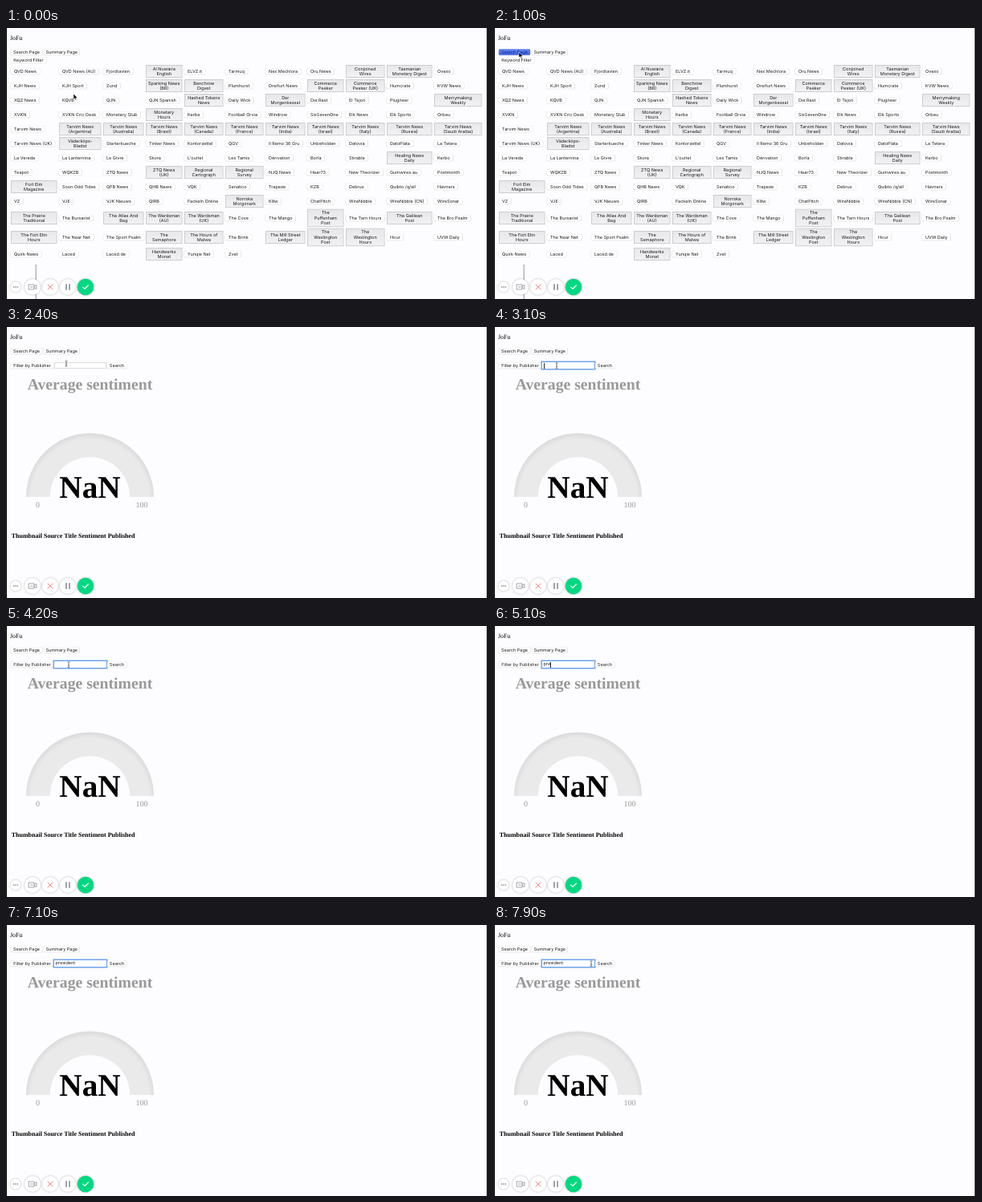
Write an HTML page that moves like this. It is 600 by 338 pixels and loops after 8 s.

```html
<!DOCTYPE html>
<html lang="en">
<head>
<meta charset="utf-8">
<title>News search</title>
<style>
  html, body { margin: 0; width: 100%; height: 100%; overflow: hidden; background: #fdfcfe; }
  #stage {
    position: relative; width: 600px; height: 338px; overflow: hidden; background: #fdfcfe;
    font: 5.5px/7px Inter, Roboto, sans-serif; color: #1c1c1c;
    text-rendering: geometricPrecision; white-space: nowrap;
  }
  .page, svg { position: absolute; inset: 0; }
  svg { width: 600px; height: 338px; }
  svg text { font-family: "Liberation Serif", "Times New Roman", serif; }

  /* Buttons are laid out at double size, which allows half-pixel lines. */
  .btn {
    position: absolute; box-sizing: border-box; width: calc(var(--w) * 2px); height: 15px; padding: 0 8px;
    transform: scale(.5) translateY(-50%); transform-origin: 0 0;
    font-size: 11px; line-height: 15px; text-align: center; background: #fff; border-radius: 3px;
    box-shadow: 0 0 1px .6px rgba(0, 0, 0, .18), 0 1px 1px rgba(0, 0, 0, .12);
  }
  .tall {
    height: auto; padding: 1px 0; border: 2px solid #cdccce; border-radius: 0; box-shadow: none;
    line-height: 13px; background: linear-gradient(#e8e7e9, #f1f0f2);
  }
  .bar { padding: 0; }

  /* One loop is 8000 ms, so 1.25% is 100 ms. */
  .anim, #typed i { animation: 8s step-end infinite; }
  #list { animation-name: list; }
  #search { animation-name: search; }
  #press { animation-name: press; background: linear-gradient(#6685ee, #3f63e4); color: #182c8a; }
  #ring { animation-name: ring; }
  #caret { animation-name: caret; }
  #pointer { animation-name: move; }
  #arrow { animation-name: arrow; }
  #beam { animation-name: beam; }

  @keyframes list { 0% { visibility: visible } 13.75%, to { visibility: hidden } }
  @keyframes search { 0% { visibility: hidden } 13.75%, to { visibility: visible } }
  @keyframes press { 0%, 13.75%, to { opacity: 0 } 12.5% { opacity: 1 } }
  @keyframes ring { 0% { opacity: 0 } 33.75%, to { opacity: 1 } }
  @keyframes caret {
    0%, 40%, 52.5%, 88.75%, to { opacity: 0 }
    33.75%, 46.25%, 56.25% { opacity: 1 }
  }
  @keyframes arrow { 0% { opacity: 1 } 28.75%, to { opacity: 0 } }
  @keyframes beam { 0%, 56.25% { opacity: 0 } 28.75%, 93.75%, to { opacity: 1 } }
  @keyframes move {
    0% { transform: translate(84px, 82px); animation-timing-function: steps(4) }
    5% { transform: translate(51px, 51px); animation-timing-function: steps(4) }
    10% { transform: translate(31px, 30px) }
    23.75% { transform: translate(31px, 30px); animation-timing-function: steps(3) }
    27.5% { transform: translate(58px, 40px); animation-timing-function: steps(2) }
    30% { transform: translate(75px, 45.5px); animation-timing-function: steps(2) }
    32.5% { transform: translate(79px, 47.5px) }
    38.75% { transform: translate(78px, 48px) }
    92.5% { transform: translate(80px, 48px); animation-timing-function: steps(5) }
    98.75%, to { transform: translate(121px, 48px) }
  }

  #field, #ring { position: absolute; box-sizing: border-box; left: 60px; top: 44px; width: 65px; height: 8px; }
  #field { background: #fff; border: 1px solid #dddce0; }
  #ring { background: #fff; box-shadow: 0 0 0 1.5px #6ea3ec; }
  #typed { position: absolute; left: 61.5px; top: 45px; height: 7px; display: flex; }
  #typed i { font-style: normal; }
  #caret { width: .8px; height: 6.5px; margin-left: .2px; background: #222; }
</style>
</head>
<body>
<div id="stage">
  <svg>
    <path d="M0 0H1V338H0ZM598.5 0H600V338H598.5Z"/>
    <text x="5" y="15" font-size="8">JoFu</text>
  </svg>
  <div class="btn bar" style="left:6px;top:30.2px;--w:39">Search Page</div>
  <div class="btn bar" style="left:47px;top:30.2px;--w:44.5">Summary Page</div>
  <div class="btn bar anim" id="press" style="left:6px;top:30.2px;--w:39">Search Page</div>

  <div class="page anim" id="list">
    <svg><path d="M37.2 295V338" stroke="#666" stroke-width=".7"/></svg>
    <div class="btn bar" style="left:5.5px;top:39.5px;--w:44">Keyword Filter</div>
  </div>

  <div class="page anim" id="search">
    <div class="btn bar" style="left:6px;top:48.4px;--w:53">Filter by Publisher</div>
    <div id="field"></div>
    <div id="ring" class="anim"></div>
    <div id="typed"></div>
    <div class="btn bar" style="left:126px;top:48.4px;--w:24">Search</div>
    <svg>
      <defs>
        <radialGradient id="shade" gradientUnits="userSpaceOnUse" cx="104.5" cy="214" r="82">
          <stop offset=".9" stop-color="#ebeaea"/>
          <stop offset="1" stop-color="#d9d8da"/>
        </radialGradient>
      </defs>
      <path d="M25 212A79.5 79.5 0 0 1 184 212H154.2A49.7 49.7 0 0 0 54.8 212Z" fill="url(#shade)"/>
      <g text-anchor="middle" fill="#999">
        <text x="104.5" y="78" font-size="19.7" font-weight="700">Average sentiment</text>
        <text x="39.5" y="225" font-size="10">0</text>
        <text x="169" y="225" font-size="10">100</text>
        <text x="104.5" y="213" font-size="39.3" font-weight="700" fill="#000">NaN</text>
      </g>
      <text x="6.7" y="262.5" font-size="8" font-weight="700" fill="#000">Thumbnail Source Title Sentiment Published</text>
    </svg>
  </div>

  <svg fill="none" stroke-linecap="round" stroke-linejoin="round">
    <g fill="#fff" style="filter:drop-shadow(0 .8px 1.3px rgba(0,0,0,.3))">
      <circle cx="12" cy="323" r="6.5"/>
      <circle cx="33" cy="323" r="10"/>
      <circle cx="55" cy="323" r="10"/>
      <circle cx="77" cy="323" r="10"/>
      <circle cx="99" cy="323" r="10.3" fill="#00d982"/>
    </g>
    <path d="M9.7 323h.01M12 323h.01M14.3 323h.01" stroke="#555" stroke-width="1.3"/>
    <path d="M28.5 320h6.5v6h-6.5zM35 322.3l3-1.8v5l-3-1.8M30.5 323h2.5" stroke="#8b8f96" stroke-width=".8"/>
    <path d="M52 320l6 6M58 320l-6 6" stroke="#ee8787" stroke-width="1"/>
    <path d="M75 319.7v6.6M79 319.7v6.6" stroke="#80858e" stroke-width="1.5"/>
    <path d="M95.8 323.2l2.3 2.2 4.2-4.4" stroke="#fff" stroke-width="1.3"/>
  </svg>

  <svg>
    <g id="pointer" class="anim">
      <path id="arrow" class="anim" d="M0 0V7L1.6 5.6 2.7 8.1 3.8 7.6 2.7 5.2H4.9Z" fill="#000" stroke="#fff" stroke-width=".5"/>
      <path id="beam" class="anim" d="M-1.4-3.3Q0-3.3 0-2.3Q0-3.3 1.4-3.3M0-2.3V2.6M-1.4 3.6Q0 3.6 0 2.6Q0 3.6 1.4 3.6M-.8 1H.8" fill="none" stroke="#444" stroke-width=".7"/>
    </g>
  </svg>
</div>

<script>
  const columns = [6, 66, 121, 174, 222, 273, 323, 375, 423, 474, 533, 595];
  const rowY = row => 53.5 + row * 18 + [3, 9, 12][row - 10] || 53.5 + row * 18;
  const countries = ["Argentina", "Australia", "Brasil", "Canada", "France", "India", "Israel", "Italy", "Russia", "Saudi Arabia"];

  // ";" separates the buttons of a row, "|" the lines of a label.
  const publishers = [
    "QVD News;QVD News (AU);Fjordtavlen;Al Nuwaira|English;ELVZ.it;Tarmuq;Nex Mechlora;Oru News;Conjoined|Wires;Tasmanian|Monetary Digest;Ovexo",
    "KJH News;KJH Sport;Zund;Sparking News|(BR);Benchrow|Digest;Plumhurst;Dreifurt News;Commerce|Peeker;Commerce|Peeker (UK);Humcrate;KVW News",
    "XQZ News;KQVB;QJN;QJN Spanish;Hashed Tokens|News;Daily Wick;Der|Morgenkessel;Die Rast;El Tejon;Plugneer;Merrymaking|Weekly",
    "XVKN;XVKN Cric Desk;Monetary Stub;Monetary|Hours;Kerbe;Football Orvia;Windrow;SixSevenOne;Elk News;Elk Sports;Orbeu",
    ["Tarvim News", ...countries.map(name => `Tarvim News|(${name})`)].join(";"),
    "Tarvim News (UK);Väderköps-|Bladet;Starterkueche;Tinker News;Kontorzettel;QGV;Il Remo 36 Gru;Unbeholden;Datovia;DatoPlata;La Tetera",
    "La Vereda;La Lanternina;Le Givre;Skora;L'ourlet;Les Tamis;Dérivation;Borla;Stirable;Healing News|Daily;Kerbo",
    "Teapot;WQKZB;ZTQ News;ZTQ News|(UK);Regional|Cartograph;Regional|Survey;NJQ News;Hear73;New Theorizer;Gumwires.au;Postmonth",
    "Fort Elm|Magazine;Soon Odd Tides;QFB News;QHB News;VQK;Senatico;Trapeze;KZB;Debrux;Quibto /q/all;Havners",
    "VZ;VJE;VJK Nieuws;QIRB;Fackeln Online;Norrska|Morgonark;K8w;ChatPitch;WireNibble;WireNibble (CN);WireSonar",
    "The Prairie|Traditional;The Bursarist;The Atlas And|Bag;The Wardsman|(AU);The Wardsman|(UK);The Cove;The Mango;The|Puffenham|Post;The Tarn Hours;The Galilean|Post;The Bro Psalm",
    "The Fort Elm|Hours;The Near Net;The Sport Psalm;The|Semaphore;The Hours of|Malwa;The Brink;The Mill Street|Ledger;The|Wexlington|Post;The|Wexlington|Hours;Hour;UVW Daily",
    "Quirk News;Laced;Laced.de;Handwerks|Monat;Yunqie Net;Zvet"
  ];

  const list = document.getElementById("list");
  publishers.forEach((labels, row) => labels.split(";").forEach((label, col) => {
    const lines = label.split("|");
    const button = document.createElement("div");
    button.className = lines.length > 1 ? "btn tall" : "btn";
    button.style.left = columns[col] + "px";
    button.style.top = rowY(row) + "px";
    if (lines.length > 1) button.style.setProperty("--w", columns[col + 1] - columns[col] - 2.5);
    button.innerHTML = lines.join("<br>");
    list.append(button);
  }));

  // Each letter gains its size at the moment its key is pressed.
  const keyTimes = [4500, 4700, 5100, 5400, 5900, 6300, 6500, 6600, 6700];
  const style = document.createElement("style");
  style.textContent = keyTimes.map((ms, i) =>
    `@keyframes key${i} { 0% { font-size: 0 } ${ms / 80}%, to { font-size: 5.5px } }`).join("\n");
  document.head.append(style);
  document.getElementById("typed").innerHTML =
    [..."president"].map((letter, i) => `<i style="animation-name:key${i}">${letter}</i>`).join("") +
    '<b id="caret" class="anim"></b>';
</script>
</body>
</html>
```
